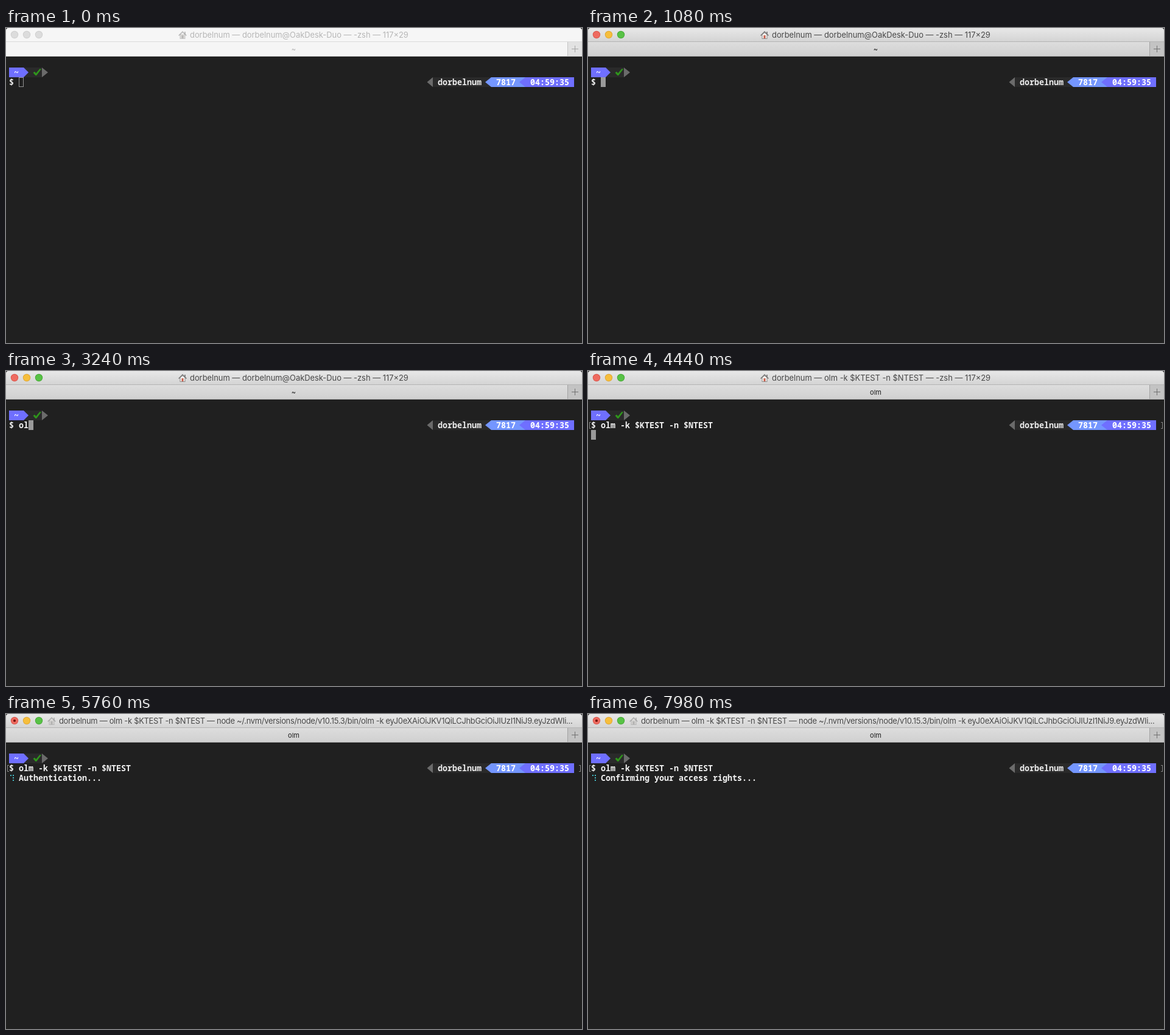
An HTML page with a canvas that plays this animation: 946 px wide and 518 px high, repeating every 8000 ms.

```html
<!DOCTYPE html>
<html lang="en">
<head>
<meta charset="utf-8">
<title>Terminal</title>
<style>
html, body { margin: 0; width: 100%; height: 100%; overflow: hidden; background: #202020; }
canvas { display: block; }
</style>
</head>
<body>
<canvas id="stage" width="946" height="518"></canvas>
<script>
const ctx = document.getElementById('stage').getContext('2d');
const W = 946, H = 518, LOOP = 8000;
const COL = 8, LEFT = 5, ROW = 16, TOP = 65;
const UI = 'Inter, Roboto, sans-serif';
const MONO = '600 13.333px "Noto Sans Mono", "DejaVu Sans Mono", monospace';
const USER = 'dorbelnum', HOST = 'OakDesk-Duo';
const COMMAND = 'olm -k $KTEST -n $NTEST';
const SPINNER = '⠋⠙⠹⠸⠼⠴⠦⠧⠇⠏';
const PURPLE = '#6f6fff', BLUE = '#7496ff', SHADE = '#2a2a2a', GREY = '#6b6b6b';

// Times in ms
const FOCUS = 60, ENTER = 4200, LAUNCH = 4860, SPIN = 5575, CONFIRM = 6120, SPIN_STEP = 74;
const KEYS = [[3180, 1], [3240, 2], [3360, 3], [3600, COMMAND.length]];

const colX = c => LEFT + c * COL;
const rowY = r => TOP + r * ROW;

function rect(x, y, w, h, fill) {
  ctx.fillStyle = fill;
  ctx.fillRect(x, y, w, h);
}

function poly(points, fill) {
  ctx.beginPath();
  points.forEach(([x, y]) => ctx.lineTo(x, y));
  ctx.closePath();
  ctx.fillStyle = fill;
  ctx.fill();
}

function disc(x, y, r, fill) {
  ctx.beginPath();
  ctx.arc(x, y, r, 0, Math.PI * 2);
  ctx.fillStyle = fill;
  ctx.fill();
}

function label(text, x, y, font, fill, align = 'left') {
  ctx.font = font;
  ctx.textAlign = align;
  ctx.fillStyle = fill;
  ctx.fillText(text, x, y);
}

const cells = (text, col, row, fill = '#f2f2f2') =>
  label(text, colX(col), rowY(row) + 13, MONO, fill);

// Triangle with a vertical base, pointing to the tip
function arrow(base, tip, row, fill) {
  const y = rowY(row);
  poly([[base, y], [tip, y + ROW / 2], [base, y + ROW]], fill);
}

function vertical(y, h, from, to) {
  const g = ctx.createLinearGradient(0, y, 0, y + h);
  g.addColorStop(0, from);
  g.addColorStop(1, to);
  return g;
}

function house(cx, alpha, door) {
  ctx.globalAlpha = alpha;
  rect(cx + 3, 6, 2, 4, '#8b8b8b');
  rect(cx - 4.5, 10, 9, 8, '#8d8d8d');
  rect(cx - 3.5, 10, 7, 7, '#f4f2ee');
  poly([[cx - 7, 12], [cx, 5], [cx + 7, 12], [cx + 5.8, 13], [cx, 7.4], [cx - 5.8, 13]], '#777');
  rect(cx - 1.5, 12, 3, 5, door);
  ctx.globalAlpha = 1;
}

function lights(active, running) {
  const fills = active ? ['#ee6b60', '#f6be3c', '#58c246'] : Array(3).fill('#dcdcdc');
  const rims = active ? ['#d9564c', '#dea633', '#45a835'] : Array(3).fill('#cecece');
  fills.forEach((fill, i) => {
    disc(14 + i * 20, 11, 6.2, rims[i]);
    disc(14 + i * 20, 11, 5.3, fill);
  });
  if (running) disc(14, 11, 2.1, '#74130d');
}

function titleText(t) {
  if (t >= LAUNCH) {
    return `${USER} — ${COMMAND} — node ~/.nvm/versions/node/v10.15.3/bin/olm -k ` +
      'eyJ0eXAiOiJKV1QiLCJhbGciOiJIUzI1NiJ9.eyJzdWIi...';
  }
  const task = t >= ENTER ? COMMAND : `${USER}@${HOST}`;
  return `${USER} — ${task} — -zsh — 117×29`;
}

function chrome(t) {
  const active = t >= FOCUS, running = t >= LAUNCH;
  ctx.beginPath();
  ctx.roundRect(0, 0, W, 46, [4, 4, 0, 0]);
  ctx.fillStyle = active ? vertical(0, 22, '#e8e8e8', '#d4d4d4') : '#f6f6f6';
  ctx.fill();
  rect(0, 22, W, 1, active ? '#b4b4b4' : '#dadada');
  rect(0, 23, W, 23, active ? vertical(23, 23, '#dddddd', '#d0d0d0') : '#f5f5f5');
  rect(922, 23, 24, 23, active ? '#c3c3c3' : '#e2e2e2');
  rect(922, 23, 1, 23, active ? '#a2a2a2' : '#c4c4c4');
  rect(0, 46, W, 1, active ? '#a6a6a6' : '#cacaca');
  const plus = active ? '#717171' : '#a5a5a5';
  rect(929, 34, 11, 1, plus);
  rect(934, 29, 1, 11, plus);

  lights(active, running);
  const plain = !active || running;
  house(running ? 75 : 290, plain ? 0.45 : 1, plain ? '#8d8d8d' : '#c9604f');
  // A long title is set with tighter tracking
  ctx.letterSpacing = running ? '-0.27px' : '0px';
  label(titleText(t), running ? 87 : 302, 16, `12.9px ${UI}`, active ? '#484848' : '#b6b6b6');
  ctx.letterSpacing = '0px';
  label(t >= ENTER ? 'olm' : '~', 472.5, 39, `11px ${UI}`, active ? '#1f1f1f' : '#b0b0b0', 'center');
}

function prompt() {
  rect(29, 65, 30, ROW, SHADE);
  rect(5, 65, 24, ROW, PURPLE);
  arrow(29, 37, 0, PURPLE);
  cells('~', 1, 0, '#fff');
  poly([[44.5, 73.5], [47, 71.7], [49.3, 74.2], [55.5, 67], [58, 67.5], [50.2, 78], [48.3, 78]], '#2f941c');
  arrow(59, 69, 0, GREY);

  rect(701, 81, 96, ROW, SHADE);
  arrow(701, 691.5, 1, GREY);
  cells(USER, 88, 1, '#ececec');
  rect(797, 81, 56, ROW, BLUE);
  arrow(797, 787, 1, BLUE);
  cells('7817', 100, 1, '#fff');
  rect(853, 81, 80, ROW, PURPLE);
  arrow(853, 843, 1, PURPLE);
  cells('04:59:35', 107, 1, '#fff');
}

function bracket(x, dir) {
  rect(x, 84, 1, 11, '#858585');
  const arm = dir > 0 ? x : x - 2;
  rect(arm, 84, 3, 1, '#858585');
  rect(arm, 94, 3, 1, '#858585');
}

function spinner(t) {
  const i = Math.floor((t - SPIN) / SPIN_STEP) % SPINNER.length;
  const dots = SPINNER.charCodeAt(i) & 63;
  for (let d = 0; d < 6; d++) {
    if (dots >> d & 1) rect(d < 3 ? 7 : 11, 100 + d % 3 * 4, 2, 2, '#45bcc6');
  }
}

function cursor(col, row, filled) {
  const x = colX(col), y = rowY(row);
  if (filled) return rect(x, y, COL, ROW, '#9a9a9a');
  ctx.strokeStyle = '#929292';
  ctx.lineWidth = 1;
  ctx.strokeRect(x + 0.5, y + 0.5, COL - 1, ROW - 1);
}

function shell(t) {
  const typed = KEYS.reduce((n, [at, count]) => t >= at ? count : n, 0);
  prompt();
  cells('$ ' + COMMAND.slice(0, typed), 0, 1);
  if (t >= ENTER) {
    bracket(2, 1);
    bracket(943, -1);
  }
  if (t >= SPIN) {
    spinner(t);
    cells(t < CONFIRM ? 'Authentication...' : 'Confirming your access rights...', 2, 2);
  } else if (t >= ENTER) {
    cursor(0, 2, true);
  } else {
    cursor(2 + typed, 1, t >= FOCUS);
  }
}

function draw(t) {
  rect(0, 0, W, H, '#202020');
  chrome(t);
  shell(t);
}

const start = performance.now();
function tick() {
  draw((performance.now() - start) % LOOP);
  requestAnimationFrame(tick);
}
tick();
</script>
</body>
</html>
```
